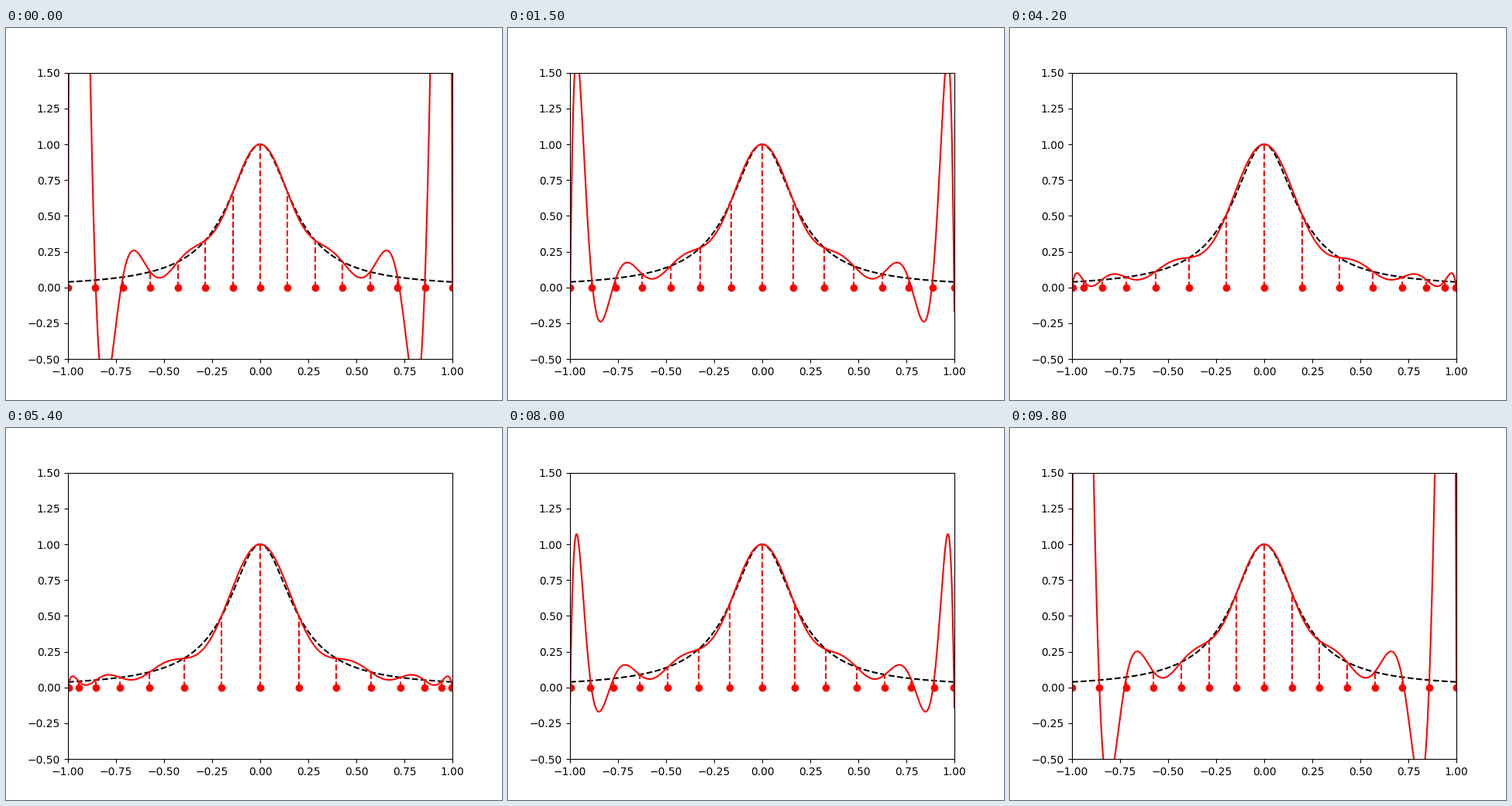
A matplotlib script for the animation above (9.9 s loop, 640 by 480 pixels).

```python
import matplotlib.pyplot as plt
import numpy as np
from matplotlib.animation import FuncAnimation
from numpy.polynomial import chebyshev as cheb

NODES = 15
STEPS = 50
FRAMES = 2 * STEPS - 1


def runge(x):
    return 1 / (1 + 25 * x**2)


def interpolate(nodes, x):
    """Polynomial through the Runge function at the nodes, evaluated at x."""
    coef = np.linalg.solve(cheb.chebvander(nodes, NODES - 1), runge(nodes))
    return cheb.chebval(x, coef)


even_nodes = np.linspace(-1, 1, NODES)
cheb_nodes = np.sin(np.arange(-(NODES // 2), NODES // 2 + 1) * np.pi / NODES)
xs = np.linspace(-1, 1, 1000)

fig, ax = plt.subplots(figsize=(6.4, 4.8), dpi=100)
ax.set_xlim(-1, 1)
ax.set_ylim(-0.5, 1.5)

ax.plot(xs, runge(xs), "k--")
curve, = ax.plot([], [], "r")
dots, = ax.plot([], [], "ro")
stems = [ax.plot([], [], "r--")[0] for _ in range(NODES)]


def update(frame):
    # Even spacing to Chebyshev spacing, one repeat at the turn, then back
    step = frame if frame < STEPS else FRAMES - frame
    t = step / (STEPS - 1)
    nodes = (1 - t) * even_nodes + t * cheb_nodes

    curve.set_data(xs, interpolate(nodes, xs))
    dots.set_data(nodes, np.zeros(NODES))
    for stem, x in zip(stems, nodes):
        stem.set_data([x, x], [0, runge(x)])
    return [curve, dots, *stems]


anim = FuncAnimation(fig, update, frames=FRAMES, interval=100, repeat=True,
                     repeat_delay=0)
plt.show()
```
